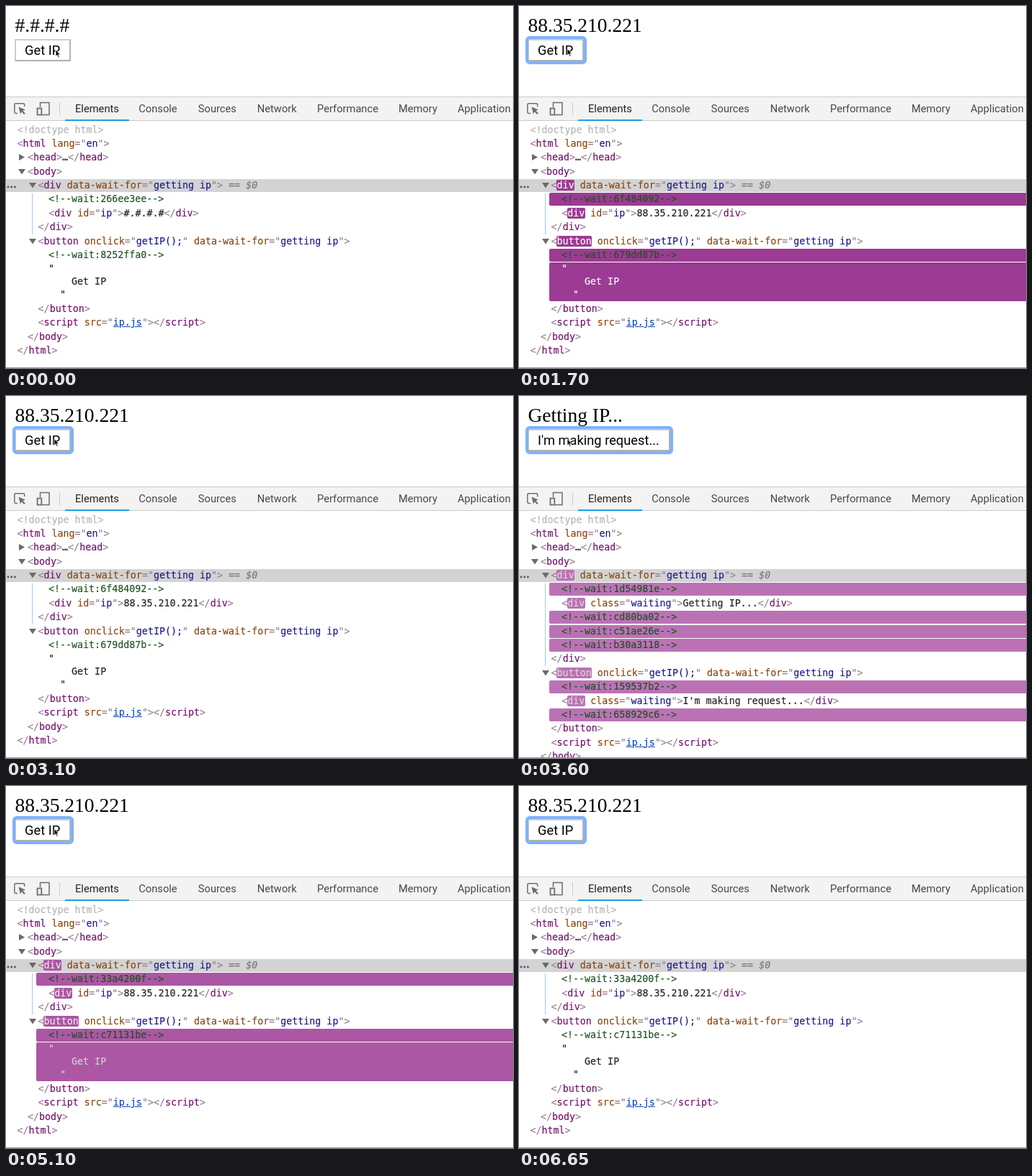
An HTML page that plays this animation: 704 px wide and 504 px high, repeating every 6.7 s.

```html
<!DOCTYPE html>
<html lang="en">
<head>
<meta charset="utf-8">
<title>Get IP</title>
<style>
  :root { --loop: 6700ms; }
  html, body { margin: 0; width: 100%; height: 100%; overflow: hidden; background: #fff; }
  #stage { position: relative; width: 704px; height: 504px; overflow: hidden; background: #fff; }
  #stage > *, .scene > *, .arrow, .dots, .guide { position: absolute; }

  /* Scenes are stacked vertically and switched by hard jumps. */
  #film { left: 0; top: 0; width: 704px; animation: scenes var(--loop) step-end infinite; }
  @keyframes scenes {
    0% { transform: none; }
    7.65% { transform: translateY(-504px); }
    25.25% { transform: translateY(-1008px); }
    51.5% { transform: translateY(-1512px); }
    75.08% { transform: translateY(-2016px); }
  }
  .scene { position: relative; width: 704px; height: 504px; overflow: hidden; }

  .ip { left: 12.5px; top: 12px; font: 27.5px/30px "Liberation Serif", Times, serif; color: #000; white-space: pre; }
  .btn {
    left: 12px; top: 46px; height: 27px; padding: 0 13px 0 12px; border: 2px solid;
    border-color: #cfcfcf #b4b4b4 #b0b0b0 #cacaca; background: #fff;
    font: 18.3px/27px Roboto, "Liberation Sans", sans-serif; color: #000; white-space: pre;
  }
  .btn::after {
    content: ""; position: absolute; inset: -6px -6px -6px -5px; border: 4.5px solid #7fb2f9;
    border-radius: 6px; box-shadow: 0 0 1px #a9cbfb;
  }
  .idle .btn::after { visibility: hidden; animation: focus var(--loop) step-end infinite; }
  @keyframes focus { 0% { visibility: hidden; } 6.3% { visibility: visible; } }

  .tree {
    left: 0; top: 163.5px; width: 704px; color: #222;
    font: 13.32px/18px "DejaVu Sans Mono", Menlo, monospace; -webkit-text-stroke: .15px;
  }
  .row { position: relative; height: 18px; margin-bottom: 1.4px; white-space: pre; }
  .row.text { height: 54px; }
  .row.sel { background: #d3d3d3; }
  .row > .in { position: relative; }
  .tag { color: #95808f; }
  .name { color: #74106d; --mid: #a894a6; --end: #74106d; border-radius: 2px; padding: 0 .5px; margin: 0 -.5px; }
  .attr { color: #8c440c; }
  .val { color: #1a1a94; }
  .link { color: #0f45b4; text-decoration: underline; }
  .note { color: #1d5420; }
  .doctype { color: #b4b4b4; }
  .ref { color: #777; }
  .fill { position: absolute; left: 42px; right: 0; top: 0; bottom: 0; border-radius: 2px 0 0 2px; --mid: #222; --end: #222; }
  .fill > span { position: absolute; left: 17px; top: 0; }
  .arrow { fill: #6a6a6a; }
  .dots { left: 1px; top: 9px; fill: #555; }
  .guide { left: 36px; width: 1px; top: 97px; background: #a6c6ec; }

  .flash .fill, .flash .open {
    animation: flash var(--loop) var(--at) infinite cubic-bezier(0, 0, .2, 1);
  }
  @keyframes flash {
    0% { background-color: #98358f; color: #fff; }
    16.72% { background-color: #f4d6f2; color: var(--mid); }
    20.9%, 100% { background-color: #f4d6f200; color: var(--end); }
  }

  #bar { left: 0; top: 126px; width: 704px; height: 32px; background: #f3f3f3; border-top: 1px solid #cbcbcb; border-bottom: 1px solid #cbcbcb; }
  #bar span { position: absolute; top: 0; font: 14.7px/32px Roboto, "Liberation Sans", sans-serif; color: #484848; white-space: pre; }
  #bar .on { color: #222; }
  #bar i { position: absolute; left: 82px; top: 31px; width: 89px; height: 2px; background: #1a9fe8; }
  #bar svg { position: absolute; left: 0; top: -1px; }
  #edge { left: 0; top: 503px; width: 704px; height: 1px; background: #9c9c9c; }

  #cursor { left: 69px; top: 61px; animation: cursor var(--loop) step-end infinite; }
  @keyframes cursor {
    0% { transform: none; }
    4.5% { transform: translate(-2px, -1.5px); visibility: visible; }
    99%, 100% { transform: translate(-2px, -1.5px); visibility: hidden; }
  }
</style>
</head>
<body>
<div id="stage">
  <div id="film"></div>
  <div id="bar">
    <svg width="80" height="34" fill="none" stroke="#6e6e6e" stroke-width="1.5">
      <path d="M16 23.5H13.5Q11.8 23.5 11.8 21.8V11.5Q11.8 9.8 13.5 9.8H24Q25.7 9.8 25.7 11.5V14"/>
      <path d="M17.5 14.5l9.5 4-3.6 1.3 3.4 3.8-1.6 1.5-3.5-3.8-1.8 3.2z" fill="#6e6e6e" stroke="none"/>
      <path d="M47.5 15V8.5H60V25.5H50"/>
      <rect x="43.5" y="16.5" width="5.8" height="9" stroke-width="1.8"/>
      <path d="M74.5 8V26" stroke="#ccc" stroke-width="1"/>
    </svg>
    <i></i>
  </div>
  <div id="edge"></div>
  <svg id="cursor" width="9" height="14" viewBox="-1 -1 9 14" style="margin:-1px 0 0 -1px">
    <path d="M0 0V9.2L2.1 7.3 3.6 11 5.2 10.3 3.7 6.8H6.5Z" fill="#000" stroke="#fff" stroke-width=".8"/>
  </svg>
</div>
<script>
  const span = (cls, text) => `<span class="${cls}">${text}</span>`;
  const tag = body => span('tag', `&lt;${body}&gt;`);
  const name = (text, open) => span(open ? 'name open' : 'name', text);
  const attr = (key, val, cls = 'val') => ` ${span('attr', key)}="${span(cls, val)}"`;
  const close = text => tag('/' + name(text));
  const open = (el, attrs = '', flash = false) => tag(name(el, flash) + attrs);

  const row = (depth, html, extra = '', cls = '') =>
    `<div class="row ${cls}">${extra}<span class="in" style="left:${15.4 + 14.6 * depth}px">${html}</span></div>`;
  const note = id =>
    `<div class="row"><div class="fill">${span('note', `&lt;!--wait:${id}--&gt;`)}</div></div>`;
  const textNode = text =>
    `<div class="row text"><div class="fill"><span>"\n    ${text}\n  "</span></div></div>`;

  const arrow = (x, d) =>
    `<svg class="arrow" style="left:${x}px;top:4px" width="11" height="11"><path d="${d}"/></svg>`;
  const down = x => arrow(x, 'M0 1H10L5 8.5Z');
  const right = x => arrow(x, 'M1 0V9L9 4.5Z');
  const dots = '<svg class="dots" width="14" height="4">' +
    [2, 6.7, 11.4].map(x => `<circle cx="${x}" cy="2" r="1.4"/>`).join('') + '</svg>';

  const waitFor = attr('data-wait-for', 'getting ip');

  function scene({ ip, ids, at }) {
    const waiting = ids.length > 2;
    const label = waiting ? "I'm making request..." : 'Get IP';
    const busy = text => row(3, open('div', attr('class', 'waiting'), true) + text + close('div'));
    const notes = ids.map(note);
    const output = waiting
      ? notes[0] + busy(ip) + notes.slice(1, 4).join('')
      : notes[0] + row(3, open('div', attr('id', 'ip'), true) + ip + close('div'));
    const button = waiting
      ? notes[4] + busy(label) + notes[5]
      : notes[1] + textNode(label);
    const cls = at === undefined ? 'idle' : 'flash';

    return `<div class="scene ${cls}" style="--at:${at || 0}ms">
      <div class="ip">${ip}</div><div class="btn">${label}</div>
      <div class="tree">` +
      row(0, span('doctype', '&lt;!doctype html&gt;')) +
      row(0, open('html', attr('lang', 'en'))) +
      row(1, open('head') + '…' + close('head'), right(17)) +
      row(1, open('body'), down(17)) +
      row(2, open('div', waitFor, true) + span('ref', ' == <em>$0</em>'), dots + down(32), 'sel') +
      output +
      row(2, close('div')) +
      row(2, open('button', attr('onclick', 'getIP();') + waitFor, true), down(32)) +
      button +
      row(2, close('button')) +
      row(2, open('script', attr('src', 'ip.js', 'link')) + close('script')) +
      row(1, close('body')) +
      row(0, close('html')) +
      `<div class="guide" style="height:${waiting ? 115 : 57}px"></div></div></div>`;
  }

  const busyText = 'Getting IP...', address = '88.35.210.221';
  document.getElementById('film').innerHTML = [
    { ip: '#.#.#.#', ids: ['266ee3ee', '8252ffa0'] },
    { ip: busyText, at: 512, ids: ['4326871f', '9adc7b7b', 'ebda7eb5', '1894242b', '8f6a254e', '27ef6d7d'] },
    { ip: address, at: 1691, ids: ['6f484092', '679dd87b'] },
    { ip: busyText, at: 3450, ids: ['1d54981e', 'cd80ba02', 'c51ae26e', 'b30a3118', '159537b2', '658929c6'] },
    { ip: address, at: 5030, ids: ['33a4200f', 'c71131be'] }
  ].map(scene).join('');

  const tabs = { Elements: 96, Console: 184.3, Sources: 266.8, Network: 348.8, Performance: 432, Memory: 545, Application: 627 };
  document.getElementById('bar').insertAdjacentHTML('beforeend', Object.entries(tabs).map(([text, x], i) =>
    `<span class="${i ? '' : 'on'}" style="left:${x}px">${text}</span>`).join(''));
</script>
</body>
</html>
```
